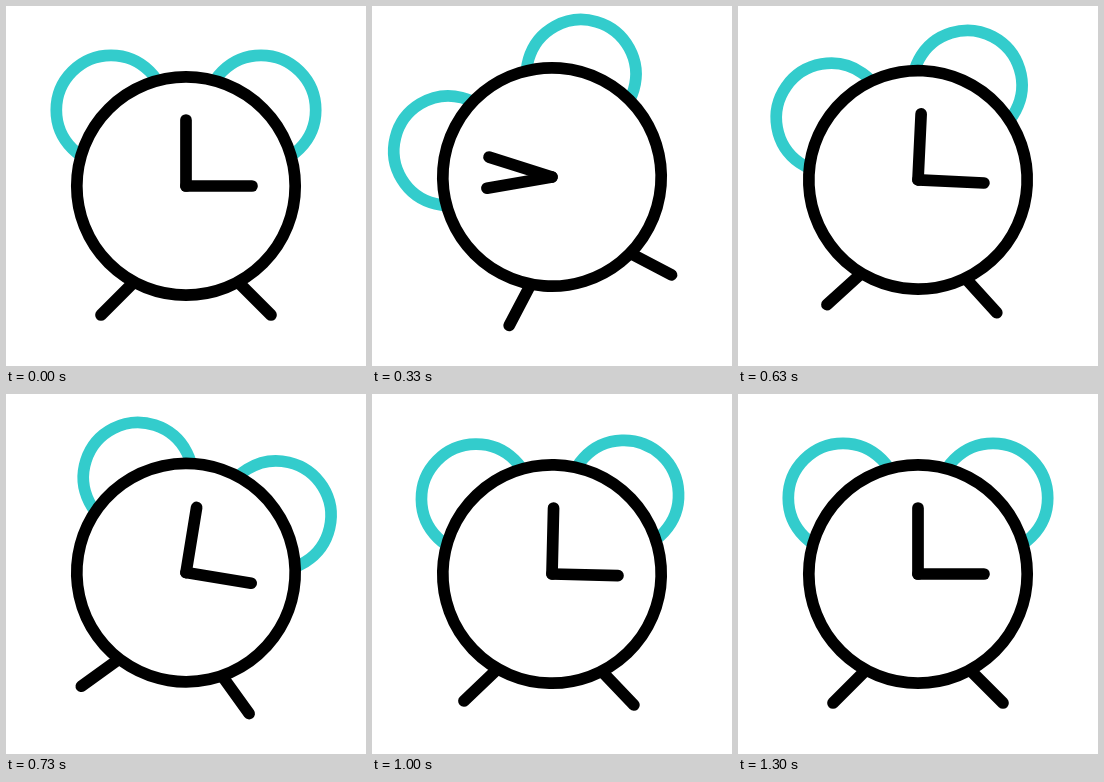
Write an HTML page that moves like this. It is 360 px wide and 360 px high and loops after 1670 ms.

```html
<!DOCTYPE html>
<html lang="en">
<head>
<meta charset="utf-8">
<title>Alarm clock</title>
<style>
  html, body { margin: 0; width: 100%; height: 100%; overflow: hidden; background: #fff; }
  svg { display: block; width: 100vw; height: 100vh; }
</style>
</head>
<body>
<svg viewBox="0 0 360 360" fill="none" stroke="#000" stroke-width="11.7" stroke-linecap="round">
  <g id="clock">
    <g stroke="#33cccc">
      <circle id="leftBell" cx="-75" cy="-76" r="54.7"/>
      <circle id="rightBell" cx="75" cy="-76" r="54.7"/>
    </g>
    <path d="M-53 97L-85 129M53 97L85 129"/>
    <circle r="109.2" fill="#fff"/>
    <path id="minute" d="M0 0V-66"/>
    <path id="hour" d="M0 0H66"/>
  </g>
</svg>
<script>
const LOOP = 1670, FPS = 30;
const LEAN = 20.6, RISE = 13.4, RELEASE = 16, HALF_SWING = 5.35;

const smooth = x => {
  x = Math.min(1, Math.max(0, x));
  return x * x * (3 - 2 * x);
};

// Lean left, hold, then rock back to rest in shrinking swings.
function swing(frame, damping) {
  const u = frame - RELEASE;
  if (u < 0) return -LEAN * smooth(frame / RISE);
  if (u > 3.5 * HALF_SWING) return 0;
  return -LEAN * Math.exp(-damping * u) * Math.cos(Math.PI * u / HALF_SWING);
}

function place(id, angle, y = 0, x = 0) {
  document.getElementById(id).setAttribute('transform', `translate(${x} ${y}) rotate(${angle})`);
}

function draw(now) {
  // Delays are rounded to 10 ms, so each step may begin slightly early.
  const frame = Math.floor((now % LOOP + 4) * FPS / 1000);
  const lift = 9 * (smooth(frame / 9) - smooth((frame - RELEASE) / 8));
  place('clock', swing(frame, 0.121), 180 - lift, 180);
  // The bells trail behind the body, the right one more.
  place('leftBell', swing(frame - 1.75, 0.15));
  place('rightBell', swing(frame - 2.8, 0.15));
  place('minute', 360 * smooth(frame / 14.5));
  place('hour', 360 * smooth(frame / 17.7));
}

const start = performance.now();
(function tick() {
  draw(performance.now() - start);
  requestAnimationFrame(tick);
})();
</script>
</body>
</html>
```
